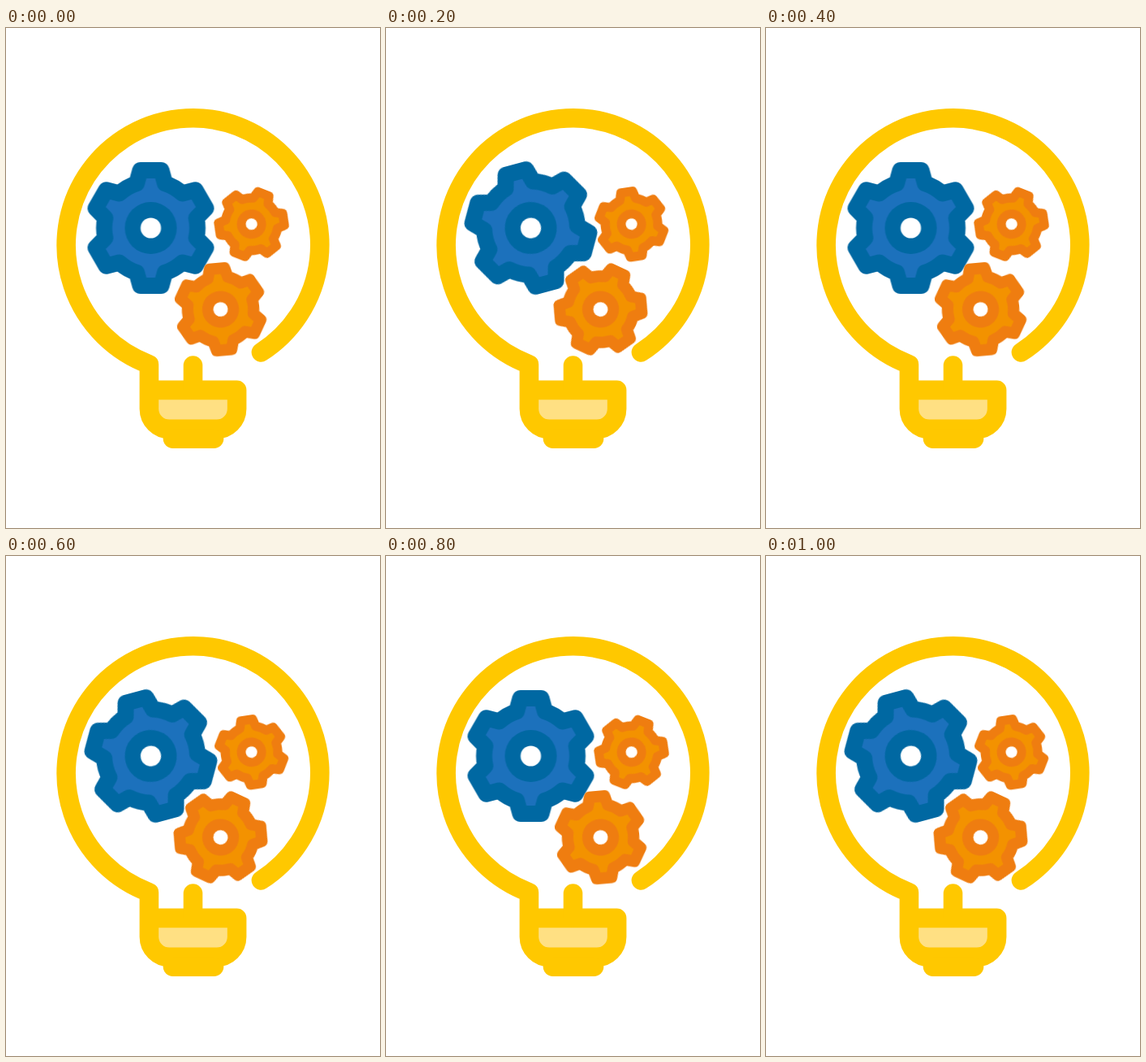
An HTML page for the animation above (1200 ms loop, 461 by 615 pixels).

```html
<!DOCTYPE html>
<html lang="en">
<head>
<meta charset="utf-8">
<title>Idea gears</title>
<style>
  html, body { margin: 0; width: 100%; height: 100%; overflow: hidden; background: #fff; }
  svg { display: block; width: 100%; height: 100%; }
  .bulb { fill: none; stroke: #ffc800; stroke-width: 23.6; stroke-linecap: round; stroke-linejoin: round; }
</style>
</head>
<body>
<svg viewBox="0 0 461 615">
  <rect x="180" y="450" width="100" height="38" fill="#ffe083"/>
  <g class="bulb">
    <path d="M314.4 398.9A156.3 156.3 0 1 0 176.4 413.7V468.5A25 25 0 0 0 201.4 493.4H259.6A25 25 0 0 0 284.6 468.5V445.4H176.4"/>
    <path d="M230.5 415V445"/>
    <path d="M205.5 505.2H256.5"/>
  </g>
  <g id="gears"></g>
</svg>
<script>
const NS = 'http://www.w3.org/2000/svg';
const TEETH = 6;
const blue = { rim: '#0068a2', face: '#1c71bc' };
const orange = { rim: '#ef7d10', face: '#f39200' };

// angles: the two held poses, in degrees
const gears = [
  { x: 178.5, y: 246, scale: 1, colors: blue, angles: [0, -15] },
  { x: 302.6, y: 241.3, scale: 0.563, colors: orange, angles: [21.5, -8.5] },
  { x: 264.5, y: 346, scale: 0.708, colors: orange, angles: [-5, 25] }
];

function add(parent, tag, attrs) {
  const el = document.createElementNS(NS, tag);
  for (const key in attrs) el.setAttribute(key, attrs[key]);
  return parent.appendChild(el);
}

// Centre line of the rim: tapered teeth joined by arcs of the body circle
function gearPath(body = 57.5, tip = 71, baseHalf = 17.5, tipHalf = 13) {
  const base = Math.sqrt(body * body - baseHalf * baseHalf);
  let d = '';
  for (let i = 0; i < TEETH; i++) {
    const a = i * 2 * Math.PI / TEETH;
    const at = (x, y) =>
      (x * Math.cos(a) + y * Math.sin(a)).toFixed(2) + ' ' +
      (x * Math.sin(a) - y * Math.cos(a)).toFixed(2);
    d += (i ? `A${body} ${body} 0 0 1 ` : 'M') + at(-baseHalf, base);
    d += 'L' + at(-tipHalf, tip) + 'L' + at(tipHalf, tip) + 'L' + at(baseHalf, base);
  }
  return d + `A${body} ${body} 0 0 1 ${-baseHalf} ${-base.toFixed(2)}Z`;
}

const outline = gearPath();
const root = document.getElementById('gears');

for (const { x, y, scale, colors, angles } of gears) {
  const place = add(root, 'g', { transform: `translate(${x} ${y}) scale(${scale})` });
  const wheel = add(place, 'g', {});
  add(wheel, 'path', {
    d: outline, fill: colors.face, stroke: colors.rim,
    'stroke-width': 20, 'stroke-linejoin': 'round'
  });
  add(wheel, 'circle', { r: 32, fill: colors.rim });
  add(wheel, 'circle', { r: 12.6, fill: '#fff' });

  const [rest, turned] = angles.map(a => `rotate(${a}deg)`);
  wheel.style.transformOrigin = '0 0';
  wheel.animate([
    { transform: rest, offset: 0, easing: 'step-end' },
    { transform: turned, offset: 0.5, easing: 'step-end' },
    { transform: rest, offset: 1 }
  ], { duration: 400, iterations: Infinity });
}
</script>
</body>
</html>
```
